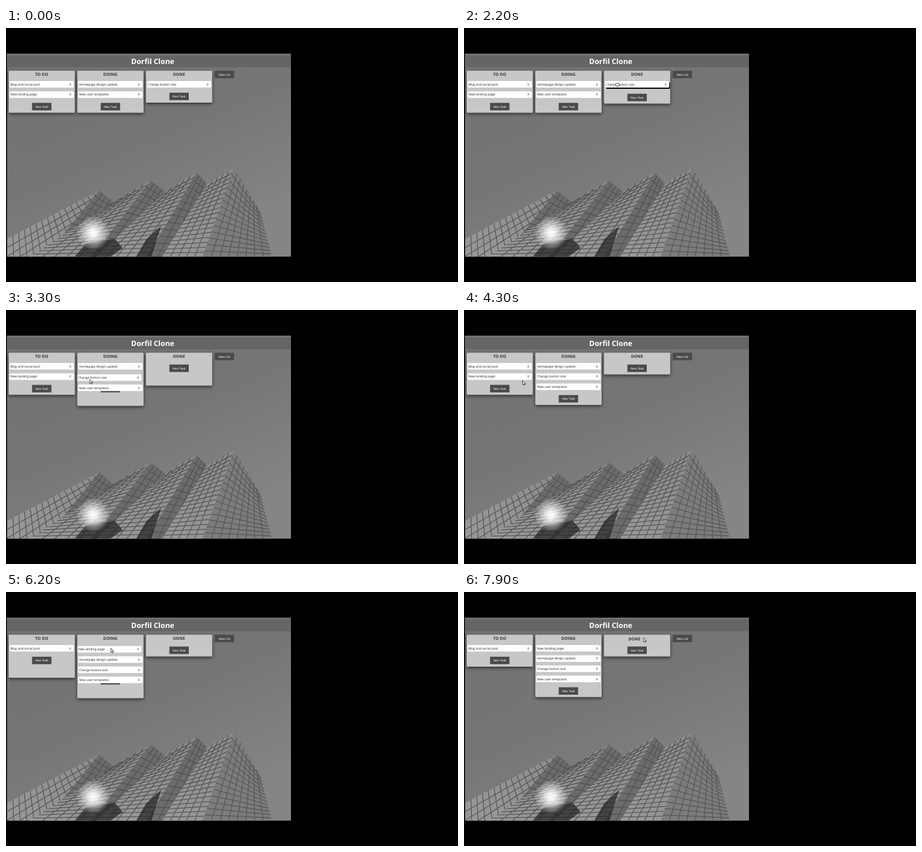
Animation, 690 px wide and 388 px high, one loop 8 s. Source, as an HTML page:

```html
<!DOCTYPE html>
<html lang="en">
<head>
<meta charset="utf-8">
<title>Task board</title>
<style>
  html, body { margin: 0; width: 100%; height: 100%; overflow: hidden; background: #000; }
  svg { display: block; width: 690px; height: 388px; }
  text { font: 4.9px "Open Sans", "Noto Sans", sans-serif; fill: #222; text-rendering: geometricPrecision; }
  .middle { text-anchor: middle; }
  .title { font-size: 11.2px; font-weight: 700; fill: #fff; }
  .heading { font-size: 6.3px; font-weight: 700; fill: #333; }
  .label { font: 4.6px "Liberation Sans", Arial, sans-serif; fill: #fff; }
  .panel { fill: #c7c7c7; filter: drop-shadow(0 2px 2.5px rgba(0, 0, 0, .6)); }
  .cursor { fill: #fff; stroke: #111; stroke-width: .7; }
</style>
</head>
<body>
<svg id="stage" viewBox="0 0 690 388">
  <defs>
    <linearGradient id="sky" x1="0" y1="0" x2=".6" y2="1">
      <stop offset="0" stop-color="#727272"/>
      <stop offset=".5" stop-color="#757575"/>
      <stop offset="1" stop-color="#858585"/>
    </linearGradient>
    <linearGradient id="glass" x1="1" y1="0" x2="0" y2="1">
      <stop offset="0" stop-color="#8a8a8a"/>
      <stop offset="1" stop-color="#9a9a9a"/>
    </linearGradient>
    <radialGradient id="glare">
      <stop offset="0" stop-color="#fff"/>
      <stop offset=".25" stop-color="#fff" stop-opacity=".85"/>
      <stop offset="1" stop-color="#fff" stop-opacity="0"/>
    </radialGradient>
    <clipPath id="window"><rect x="1.5" y="39.5" width="433.5" height="309.7"/></clipPath>
  </defs>
</svg>
<script>
const NS = 'http://www.w3.org/2000/svg';
const stage = document.getElementById('stage');
const LOOP = 8000, FRAME = 100, ROW = 15.55, GAP = .1;
// Phases of a drag, in ms after the press
const LIFT = 250, ENTER = 600, DROP = 1150, SETTLE = 1400, SLIDE = 200;

function add(parent, tag, attrs, content) {
  const node = document.createElementNS(NS, tag);
  for (const name in attrs) node.setAttribute(name, attrs[name]);
  if (content) node.textContent = content;
  return parent.appendChild(node);
}
const place = (node, x, y) => node.setAttribute('transform', `translate(${x} ${y})`);
const show = (node, visible) => node.setAttribute('opacity', visible ? 1 : 0);
const mix = (a, b, p) => a + (b - a) * p;
const mixPoint = (a, b, p) => a.map((v, i) => mix(v, b[i], p));
const ease = p => {
  p = Math.min(1, Math.max(0, p));
  return p * p * (3 - 2 * p);
};

// Backdrop
const scene = add(stage, 'g', { 'clip-path': 'url(#window)' });
add(scene, 'rect', { x: 1, y: 39, width: 435, height: 311, fill: 'url(#sky)' });

// A face has its peak and side on top, then the feet below them.
function facade([peak, side, sideFoot, peakFoot], cols, rows, fill, ink) {
  const at = (u, v) => mixPoint(mixPoint(peak, side, u), mixPoint(peakFoot, sideFoot, u), v);
  const line = (from, to, width) => `M${from}L${to}` + width;
  let d = '';
  for (let r = 1; r < rows; r++) d += line(at(0, r / rows), at(1, r / rows), '');
  for (let c = 1; c < cols; c++) d += line(at(c / cols, 0), at(c / cols, 1), '');
  add(scene, 'polygon', { points: [peak, side, sideFoot, peakFoot].join(' '), fill });
  add(scene, 'path', { d, fill: 'none', stroke: ink, 'stroke-width': 1.3, opacity: .6 });
}

const peaks = [[142, 248], [221, 233], [291, 221], [348, 214]];
const valleys = [[2, 322], [164, 266], [243, 250], [307, 238], [388, 280]];
const feet = [60, 130, 215, 300, 406].map(x => [x, 350]);
facade([peaks[0], valleys[0], [2, 375], valleys[1]], 16, 4, 'url(#glass)', '#333');
peaks.forEach((peak, i) => {
  const foot = feet[i], last = i === peaks.length - 1;
  if (i) facade([peak, valleys[i], [foot[0] - 110 + i * 16, 350], foot], 5, 18, 'url(#glass)', '#333');
  facade([peak, valleys[i + 1], last ? feet[4] : [foot[0] + 65, 350], foot],
    last ? 8 : 4, last ? 14 : 12, last ? '#7c7c7c' : '#6b6b6b', '#444');
});
for (const points of ['105,349 122,329 166,322 178,336 160,349', '199,349 214,323 237,302 222,349'])
  add(scene, 'polygon', { points, fill: '#222', opacity: .7 });
add(scene, 'circle', { cx: 133, cy: 313, r: 26, fill: 'url(#glare)' });

add(scene, 'rect', { x: 1, y: 39, width: 435, height: 21, fill: '#656565' });
add(scene, 'rect', { x: 1, y: 39, width: 435, height: 2.5, fill: '#767676' });
add(scene, 'text', { x: 224, y: 55.3, class: 'title middle' }, 'Dorfil Clone');

function button(label) {
  const g = add(scene, 'g');
  add(g, 'rect', { width: 29.6, height: 11.4, fill: '#4a4a4a' });
  add(g, 'text', { x: 14.8, y: 7.4, class: 'label middle' }, label);
  return g;
}
place(button('New List'), 318.6, 65.3);

const columnX = col => 4 + col * 104.8;
const slot = (col, row) => [columnX(col) + 1.6, 81.1 + row * ROW];

const lists = ['TO DO', 'DOING', 'DONE'].map((name, col) => {
  const x = columnX(col);
  return {
    x,
    panel: add(scene, 'rect', { x, y: 65.3, width: 101.2, rx: 1.5, class: 'panel' }),
    heading: add(scene, 'text', { x: x + 50.5, y: 73, class: 'heading middle' }, name),
    button: button('New Task')
  };
});

const opening = [
  ['Blog and social post', 'New landing page'],
  ['Homepage design update', 'New user templates'],
  ['Change button size']
];
const deck = add(scene, 'g');
const cards = {};
for (const name of opening.flat()) {
  const node = add(deck, 'g');
  const shade = add(node, 'rect', { x: 1.8, y: 1.8, width: 97.6, height: 10, rx: 1.5, fill: '#111' });
  add(node, 'rect', { width: 98, height: 10, rx: 1.5, fill: '#fff' });
  add(node, 'text', { x: 1.1, y: 6.8 }, name);
  add(node, 'text', { x: 92.6, y: 6.8, class: 'middle' }, 'X');
  cards[name] = { node, shade };
}

const moves = [
  { card: 'Change button size', press: 2050, grip: [234, 84], from: [2, 0], to: [1, 1] },
  { card: 'New landing page', press: 4950, grip: [55, 98], from: [0, 1], to: [1, 0] }
];

// Stops of the pointer: time and point. Each drag ends slightly off its slot.
const stops = [
  [900, [150, 190]], [1200, [154.5, 151.5]], [3300, [128, 106]],
  [4300, [89.5, 108]], [6200, [160, 86]], [7800, [274, 70]]
];
for (const { press, grip, from, to } of moves) {
  const start = slot(...from), end = slot(...to);
  const release = [grip[0] + end[0] - start[0] - 3, grip[1] + end[1] - start[1] + 3];
  stops.push([press, grip], [press + LIFT, grip], [press + DROP, release]);
}
stops.sort((a, b) => a[0] - b[0]);

function pointer(t) {
  const next = stops.findIndex(stop => stop[0] > t);
  if (next < 0) return stops.at(-1)[1];
  if (next === 0) return stops[0][1];
  const [a, b] = [stops[next - 1], stops[next]];
  return mixPoint(a[1], b[1], ease((t - a[0]) / (b[0] - a[0])));
}

const arrow = add(scene, 'path', { class: 'cursor', d: 'M0 0V6.2L1.5 4.9L2.5 7L3.6 6.5L2.6 4.5H4.5Z' });
const hand = add(scene, 'path', {
  class: 'cursor',
  d: 'M-2.4 2.6Q-3.2 1 -1.8 1Q-1.4 -.2 -.5 .4Q.3 -.5 1 .5Q2 0 2.2 1Q3.4 .9 3 2.7L2.2 5H-1.4Z'
});

function boardAt(t) {
  const columns = opening.map(names => [...names]);
  for (const move of moves) {
    if (t < move.press) break;
    if (t < move.press + SETTLE) return { columns, move };
    columns[move.from[0]].splice(move.from[1], 1);
    columns[move.to[0]].splice(move.to[1], 0, move.card);
  }
  return { columns };
}

function carried({ press, grip, from, to }, t) {
  const point = pointer(Math.min(t, press + DROP));
  const held = slot(...from).map((v, i) => v + point[i] - grip[i]);
  return mixPoint(held, slot(...to), ease((t - press - DROP) / SLIDE));
}

function draw(t) {
  const { columns, move } = boardAt(t);
  const age = move ? t - move.press : 0;
  const gripping = !!move && age < DROP;

  columns.forEach((names, col) => {
    const list = lists[col], count = names.length;
    const source = move && col === move.from[0];
    const target = move && col === move.to[0];
    let rows = count, foot = count;
    if (source) {
      rows += GAP;
      foot = age < LIFT ? rows : count - 1;
    }
    if (target && age >= ENTER) rows += 1 + GAP;
    list.panel.setAttribute('height', 33.1 + rows * ROW);
    place(list.button, list.x + 35.8, 83.3 + foot * ROW);

    names.forEach((name, row) => {
      const pushed = target && row >= move.to[1] ? (1 + GAP) * ease((age - ENTER) / SLIDE) : 0;
      place(cards[name].node, ...slot(col, row + pushed));
      show(cards[name].shade, gripping && name === move.card);
    });
  });

  if (move) {
    const { node } = cards[move.card];
    if (deck.lastChild !== node) deck.append(node);
    place(node, ...carried(move, t));
  }

  const [x, y] = pointer(t);
  const hovered = x > 250 && y < 76;
  place(lists[2].heading, hovered ? -4 : 0, hovered ? .6 : 0);
  place(arrow, x, y);
  place(hand, x, y);
  show(arrow, t >= stops[0][0] && !gripping);
  show(hand, gripping);
}

const began = performance.now();
function tick() {
  const t = (performance.now() - began) % LOOP;
  draw(Math.floor(t / FRAME) * FRAME);
  requestAnimationFrame(tick);
}
tick();
</script>
</body>
</html>
```
